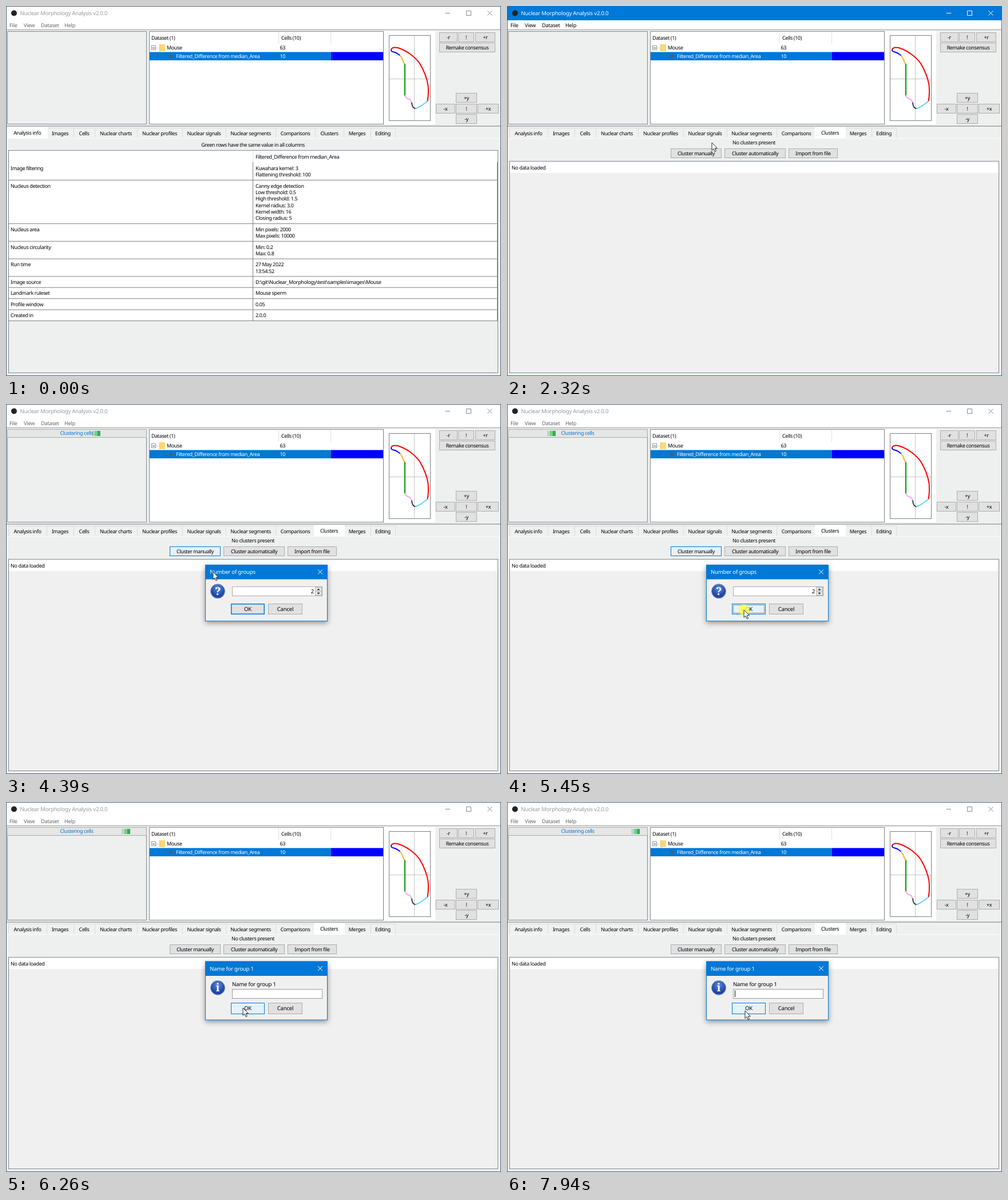
These frames come from a looping animation (865x647 px, 8000 ms). An HTML page:

```html
<!DOCTYPE html>
<html lang="en">
<head>
<meta charset="utf-8">
<title>Nuclear Morphology Analysis</title>
<style>
  html, body { margin: 0; width: 100%; height: 100%; overflow: hidden; background: #eef0f0; }
  svg { display: block; width: 100%; height: 100%; }
  text { font: 9px "Noto Sans", sans-serif; letter-spacing: -.38px; text-rendering: geometricPrecision; white-space: pre; }
  text.ui { font-size: 9.6px; letter-spacing: -.23px; }
  text.menu { font-size: 9.2px; letter-spacing: -.23px; }
  text.symbol { font: bold 19px "Noto Serif", serif; }
  .anim { animation: 8s step-end infinite; }
  .dialog { transform-box: fill-box; transform-origin: center; }
  .shadow { filter: drop-shadow(0 3px 5px rgba(0, 0, 0, .4)); }
</style>
</head>
<body>
<svg id="stage" viewBox="0 0 865 647" preserveAspectRatio="none"></svg>
<script>
const BLUE = '#0078d7', INK = '#000', GREY = '#eef0f0';

// Drawing helpers. Boxes are given by their edges, text by its vertical centre.
const box = (x1, y1, x2, y2, fill, stroke = 'none') => {
  const inset = stroke === 'none' ? 0 : .5;
  return `<rect x="${x1 + inset}" y="${y1 + inset}" width="${x2 - x1 - 2 * inset}" height="${y2 - y1 - 2 * inset}" fill="${fill}" stroke="${stroke}"/>`;
};
const text = (x, y, s, { fill = INK, cls = '', anchor = 'start' } = {}) =>
  `<text x="${x}" y="${y + 3.3}" fill="${fill}" class="${cls}" text-anchor="${anchor}">${s}</text>`;
const mid = (x, y, s, opts) => text(x, y, s, { ...opts, anchor: 'middle' });
const line = (d, stroke, width = 1, extra = '') =>
  `<path d="${d}" fill="none" stroke="${stroke}" stroke-width="${width}" ${extra}/>`;
const group = (name, content, cls = '') =>
  `<g class="anim ${cls}" style="animation-name:${name}">${content}</g>`;
const button = (x1, y1, x2, y2, label, { hot = false, cls = '' } = {}) =>
  box(x1, y1, x2, y2, hot ? '#e5f1fb' : '#e1e1e1', hot ? BLUE : '#adadad') +
  mid((x1 + x2) / 2, (y1 + y2) / 2 - .3, label, { cls });

// Timelines: [ms, declarations, easing until the next entry]
let css = '';
const timeline = (name, frames) => {
  css += `@keyframes ${name}{` + frames.map(([ms, rules, easing = 'step-end']) =>
    `${(ms / 80).toFixed(4)}%{${rules};animation-timing-function:${easing}}`).join('') + '}';
};
const shown = (name, ...spans) => timeline(name, [
  ...(spans[0][0] > 0 ? [[0, 'opacity:0']] : []),
  ...spans.flatMap(([from, to]) => [[from, 'opacity:1'], [to, `opacity:${to < 8000 ? 0 : 1}`]]),
  ...(spans.at(-1)[1] < 8000 ? [[8000, 'opacity:0']] : []),
]);

function windowFrame(active) {
  const ink = active ? '#fff' : '#999';
  const menu = [[6, 'File'], [31, 'View'], [61, 'Dataset'], [102, 'Help']];
  const controlInk = active ? '#fff' : '#888';
  return box(0, 0, 865, 25, active ? BLUE : '#fff') + box(1, 25, 864, 41, '#fff') +
    '<circle cx="14" cy="12.5" r="5" fill="#222"/>' +
    text(24.5, 12.5, 'Nuclear Morphology Analysis v2.0.0', { fill: ink, cls: 'ui' }) +
    menu.map(([x, s]) => text(x, 33.7, s, { fill: active ? INK : '#666', cls: 'menu' })).join('') +
    line('M767.5 12.5h8.5M804.5 8.5h8v8h-8zM841.5 8.5l8 8m0-8l-8 8', controlInk) +
    box(0, 0, 865, 647, 'none', active ? BLUE : '#4a5d72');
}

function datasetTree() {
  return box(250, 44, 660, 207, '#fff', '#828790') +
    line('M476.5 46v20M567.5 46v20', '#ddd') +
    text(254, 56, 'Dataset (1)') + text(481, 56, 'Cells (10)') +
    box(254, 69, 262, 77, '#fff', '#919191') + line('M256 73.5h4', '#333') +
    line('M262 73.5h5', '#aaa', 1, 'stroke-dasharray="1 1"') +
    box(268, 67, 278, 79, '#ffd873') + line('M268.5 67v12', '#eebd4d') +
    text(281, 73, 'Mouse') + text(478.5, 73, '63') +
    box(251, 80.5, 568, 95, BLUE) + box(568, 80.5, 659, 95, '#00f') +
    line('M272.5 81v7h11', '#4b7ca8', 1, 'stroke-dasharray="1 1"') +
    '<circle cx="288" cy="88" r="2.8" fill="#5c5960"/>' +
    text(297, 88, 'Filtered_Difference from median_Area', { fill: '#fff' }) +
    text(478.5, 88, '10', { fill: '#fff' });
}

function consensus() {
  const segments = [
    ['#f00', 'M672.5 75.5Q675 70.5 684 72.5C699 77 714 88 722.5 100C729 111 735 125 737 138Q738.5 152 736 166'],
    ['#00f', 'M672.5 75.5Q672 79 677 80T688 86'],
    ['#fbb02d', 'M688 86Q692 91 693 95T696.5 101'],
    ['#0a930a', 'M696.5 101V156'],
    ['#f7a8f0', 'M696.5 156Q699 161 703 162T708 168'],
    ['#2d3540', 'M708.5 168Q709 178 715 179'],
    ['#5bd5fb', 'M715 179Q721 177 725 174T736 166'],
  ];
  return box(661, 44, 750, 207, '#fff') + box(669, 51, 742, 201, '#fff', '#808080') +
    line('M713.5 52v148M670 127.5h71', '#c4c4c4') +
    `<g transform="translate(.5 .5)">${segments.map(([colour, d]) => line(d, colour, 2)).join('')}</g>`;
}

const TABS = ['Analysis info', 'Images', 'Cells', 'Nuclear charts', 'Nuclear profiles', 'Nuclear signals',
  'Nuclear segments', 'Comparisons', 'Clusters', 'Merges', 'Editing'];
const EDGES = [4, 71, 118, 155, 229, 308, 384, 471, 540, 590, 637, 680];

function tabPane(selected) {
  const centre = i => (EDGES[i] + EDGES[i + 1]) / 2;
  const tabs = TABS.map((name, i) => i === selected ? '' :
    box(EDGES[i], 213, EDGES[i + 1] + 1, 232, '#f0f0f0', '#dcdcdc') + mid(centre(i), 222.7, name)).join('');
  return box(1, 211, 864, 646, GREY) + tabs + box(2, 231, 862, 644, GREY, '#fafafa') +
    box(EDGES[selected] - 2, 211.5, EDGES[selected + 1] + 2, 232, '#fff') +
    mid(centre(selected) - .3, 221.2, TABS[selected]);
}

function analysisTab() {
  const rows = [
    ['Image filtering', 'Kuwahara kernel: 3', 'Flattening threshold: 100'],
    ['Nucleus detection', 'Canny edge detection', 'Low threshold: 0.5', 'High threshold: 1.5',
      'Kernel radius: 3.0', 'Kernel width: 16', 'Closing radius: 5'],
    ['Nucleus area', 'Min pixels: 2000', 'Max pixels: 10000'],
    ['Nucleus circularity', 'Min: 0.2', 'Max: 0.8'],
    ['Run time', '27 May 2022', '13:54:52'],
    ['Image source', 'D:\\git\\Nuclear_Morphology\\test\\samples\\images\\Mouse'],
    ['Landmark ruleset', 'Mouse sperm'],
    ['Profile window', '0.05'],
    ['Created in', '2.0.0'],
  ];
  const lineHeight = 11.35, padding = 8.05;
  let top = 273.75;
  const body = rows.map(([label, ...values]) => {
    const y = top + 9.8;
    top += padding + values.length * lineHeight;
    return line(`M5 ${top}h854`, '#808080') + text(8, y, label) +
      values.map((v, k) => text(436, y + k * lineHeight, v)).join('');
  }).join('');
  return tabPane(0) + mid(431.5, 242.7, 'Green rows have the same value in all columns') +
    box(4, 252, 860, 642, GREY, '#828790') + box(5, 253, 859, 550.5, '#fff') +
    line('M431.5 253v20', '#e4e4e4') + line('M431.5 273v277.5M858.5 273v277.5', '#808080') +
    text(436, 264, 'Filtered_Difference from median_Area') + body;
}

function clustersTab() {
  return tabPane(8) + mid(431.5, 239, 'No clusters present') +
    button(286, 249, 375, 266, 'Cluster manually') +
    button(380, 249, 487, 266, 'Cluster automatically') +
    button(492, 249, 578, 266, 'Import from file') +
    box(4, 271, 860, 642, '#f0f0f0', '#828790') + box(5, 272, 859, 292, '#fff') +
    text(8, 282.5, 'No data loaded');
}

function dialog(top, bottom, title, symbol, body) {
  const iconY = top + 46.3;
  return `<g class="shadow">${box(348, top, 562, bottom, '#f0f0f0', BLUE)}</g>` +
    box(348, top, 562, top + 25.5, BLUE) +
    text(356, top + 12.7, title, { fill: '#fff', cls: 'ui' }) +
    line(`M545 ${top + 8.5}l8 8m0-8l-8 8`, '#fff') +
    `<circle cx="370" cy="${iconY}" r="12.5" fill="url(#ball)" stroke="#8d9cb8"/>` +
    mid(370, iconY + 3.2, symbol, { fill: '#fff', cls: 'symbol' }) + body;
}

function countDialog() {
  return dialog(281, 380, 'Number of groups', '?',
    box(395, 319, 553, 336, '#fff', '#adadad') +
    text(538, 327.5, '2', { cls: 'ui', anchor: 'end' }) +
    box(540, 320, 552, 328, '#e6e6e6', '#b5b5b5') + box(540, 327, 552, 335, '#e6e6e6', '#b5b5b5') +
    '<path d="M543.5 325.5l2.5-3 2.5 3zM543.5 329.8l2.5 3 2.5-3z" fill="#222"/>' +
    button(393, 349, 452, 368, 'OK', { cls: 'ui' }) + box(393, 349, 452, 368, 'none', BLUE) +
    box(394, 350, 451, 367, 'none', '#6cb0e5') +
    group('okHover', button(393, 349, 452, 368, 'OK', { hot: true, cls: 'ui' }) +
      line('M395.5 351.5h54v14h-54z', '#333', 1, 'stroke-dasharray="1 1"')) +
    button(458, 349, 518, 368, 'Cancel', { cls: 'ui' }));
}

function nameDialog() {
  return dialog(278.5, 381.5, 'Name for group 1', 'i',
    text(395, 319, 'Name for group 1', { cls: 'ui' }) +
    box(395, 327, 553, 344, '#fff', '#9a9a9a') +
    group('caret', line('M398.5 329.5v11.5', '#000')) +
    button(393, 351, 452, 371, 'OK', { hot: true, cls: 'ui' }) +
    button(458, 351, 518, 371, 'Cancel', { cls: 'ui' }));
}

function progress() {
  const bands = ['#b9d8c0', '#72cf88', '#2fae52'];
  return box(2, 44, 246, 59, '#e6e6e6', '#a8a8a8') +
    '<g clip-path="url(#track)">' +
    group('slide', bands.map((c, i) => box(i * 5, 47, i * 5 + 5, 56, c)).join('')) + '</g>' +
    mid(123.5, 50.7, 'Clustering cells', { fill: BLUE });
}

const pad = [
  [757, 46, 789, 63, '-r'], [790, 46, 818, 63, '!'], [820, 46, 855, 63, '+r'],
  [757, 64, 855, 81, 'Remake consensus'], [786, 152, 823, 169, '+y'], [751, 171, 785, 188, '-x'],
  [786, 171, 823, 188, '!'], [824, 171, 861, 188, '+x'], [786, 189, 823, 206, '-y'],
];

const pointer = group('click', '<circle r="9.5" fill="#ffff3c" opacity=".8"/>') +
  '<path d="M0 0V13.3L3 10.6 5.2 15.6 7.3 14.7 5.2 9.8H9.4Z" fill="#fff" stroke="#111" stroke-width=".9"/>';

document.getElementById('stage').innerHTML =
  `<defs>
    <radialGradient id="ball" cy=".3"><stop stop-color="#5b8ce0"/><stop offset="1" stop-color="#2348a4"/></radialGradient>
    <clipPath id="track"><rect x="3" y="45" width="242" height="13"/></clipPath>
  </defs>` +
  box(0, 0, 865, 647, GREY) + windowFrame(false) +
  line('M1 41.5h863', '#9a9a9a') + line('M1 210h863', '#777') +
  box(2, 44, 246, 207, GREY, '#828790') + group('busy', progress()) +
  datasetTree() + consensus() + pad.map(b => button(...b)).join('') +
  analysisTab() + group('clusters', clustersTab()) +
  group('manualHover', button(286, 249, 375, 266, 'Cluster manually', { hot: true })) +
  box(0, 0, 865, 647, 'none', '#4a5d72') + group('active', windowFrame(true)) +
  group('countDialog', countDialog(), 'dialog') + group('nameDialog', nameDialog(), 'dialog') +
  group('pointer', pointer);

shown('active', [1240, 3490], [5590, 5780]);
shown('clusters', [1310, 8000]);
shown('manualHover', [2460, 5590]);
shown('busy', [3490, 8000]);
shown('click', [1170, 1440], [3350, 3555], [5300, 5520]);
shown('okHover', [4810, 8000]);
shown('caret', [5850, 6200], [6700, 7200], [7700, 8000]);

const pose = (opacity, scale) => `opacity:${opacity};transform:scale(${scale})`;
timeline('countDialog', [[0, pose(0, 1)], [3555, pose(.7, .98)], [3625, pose(.93, .995)], [3695, pose(1, 1)],
  [5590, pose(.5, .98)], [5660, pose(0, 1)], [8000, pose(0, 1)]]);
timeline('nameDialog', [[0, pose(0, 1)], [5780, pose(.6, .97)], [5850, pose(.87, .99)], [5920, pose(1, 1)],
  [8000, pose(1, 1)]]);

const at = (x, y = 0) => `transform:translate(${x}px,${y}px)`;
timeline('slide', [
  [0, at(8)], [3488, at(8), 'steps(22)'], [5009, at(248)],
  [5010, at(4), 'steps(23)'], [6599, at(257)],
  [6600, at(10), 'steps(20)'], [8000, at(228)],
]);
timeline('pointer', [
  [0, at(-50, -50)],
  [330, at(797, 606), 'steps(3)'], [540, at(752, 536), 'steps(3)'], [750, at(630, 345), 'steps(3)'],
  [960, at(564, 243), 'steps(2)'], [1100, at(557, 214)],
  [1900, at(557, 214), 'steps(2)'], [2040, at(510, 220), 'steps(4)'],
  [2320, at(358, 239), 'steps(6)'], [2740, at(335, 260)],
  [4110, at(335, 260), 'steps(6)'], [4530, at(375, 310), 'steps(6)'],
  [4950, at(413, 355), 'steps(2)'], [5090, at(414, 360)],
  [6400, at(416, 365)], [8000, at(416, 365)],
]);
document.head.appendChild(document.createElement('style')).textContent = css;
</script>
</body>
</html>
```
